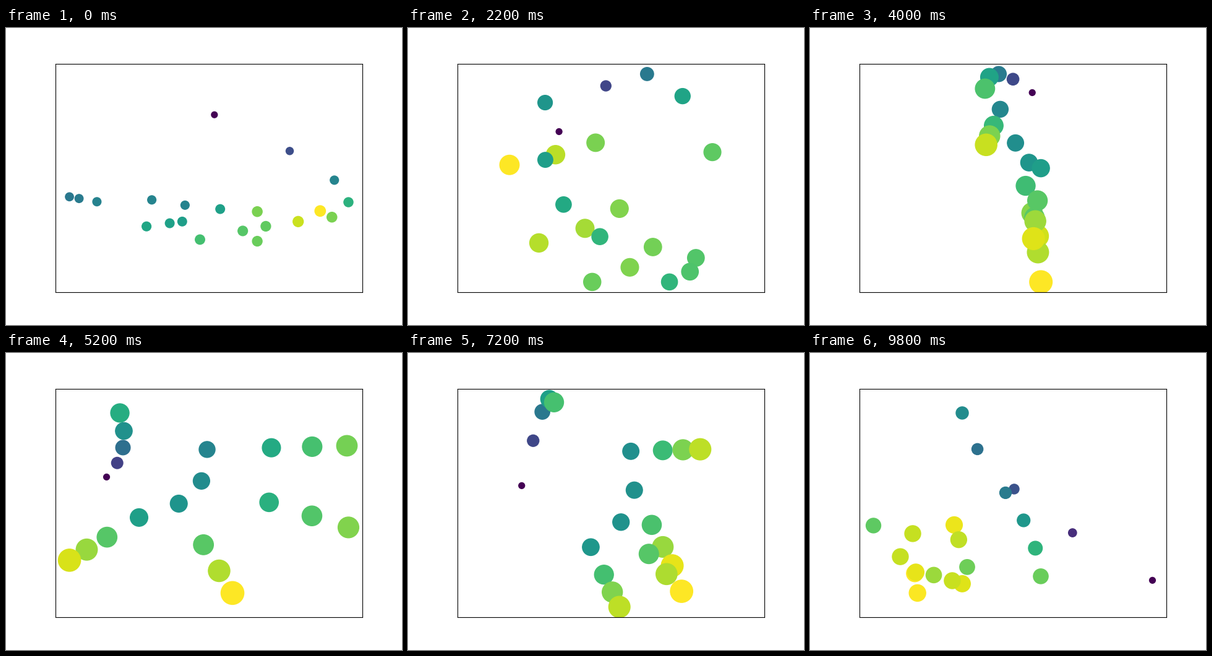
A matplotlib script for the animation above (10000 ms loop, 640 by 480 pixels).

```python
import numpy as np
import matplotlib.pyplot as plt
from matplotlib.animation import FuncAnimation

FRAMES, STEP = 50, 200
LEFT, RIGHT, TOP, BOTTOM = 80, 576, 57.6, 427.2
BASE_SIZE = 50
PIP_REACH = 0.46   # middle joint of a straight finger, as a share of its length
OPEN_DIP = 0.54    # last joint, as a share of the way from middle joint to tip
BENT_DIP = 0.35


def curve(points, count):
    """Sample the polynomial through evenly spaced key points (x, y, depth)."""
    order = len(points)
    coefs = np.polyfit(np.linspace(0, 1, order), points, order - 1)
    return np.vander(np.linspace(0, 1, count), order) @ coefs


def hand(thumb, knuckles, tips, bends=None):
    """Joints of a hand: wrist and thumb on one curve, then four fingers.

    Straight fingers run from knuckle to tip, bent ones turn at a middle joint.
    """
    base, tip = curve(knuckles, 4), curve(tips, 4)
    if bends:
        pip, share = curve(bends, 4), BENT_DIP
    else:
        pip, share = base + PIP_REACH * (tip - base), OPEN_DIP
    dip = pip + share * (tip - pip)
    fingers = np.stack([base, pip, dip, tip], axis=1).reshape(-1, 3)
    return np.vstack([curve(thumb, 5), fingers])


# step, growth of dot size with depth, joints
poses = [
    (0, 106, hand(
        thumb=[(337.5, 140, 0), (532, 246, .45), (528, 306, .8)],
        knuckles=[(407, 297, .8), (318, 290, .49), (236, 278, .45)],
        tips=[(407, 345, .77), (270, 334, .65), (147, 281, .44)],
        bends=[(509, 296, 1), (359, 321, .65), (102.5, 273, .4)])),
    (7, 305, hand(
        thumb=[(102.5, 261, 0), (387, 146, .36), (553.5, 235, .72)],
        knuckles=[(271, 127, .57), (216, 248, .66), (209, 358, .76)],
        tips=[(400, 172, 1), (324, 254, .66), (288, 343, .36)],
        bends=[(472, 172, .88), (431, 270, .88), (381, 352, .72)])),
    (15, 626, hand(
        thumb=[(505, 103.5, 0), (407, 96.5, .45), (379, 173, .78)],
        knuckles=[(307, 176, .47), (377, 227, .5), (485, 229, .55)],
        tips=[(102.5, 263, 1), (291, 398, 1), (553.5, 340, .95)])),
    (26, 668, hand(
        thumb=[(162.5, 200.5, 0), (189, 153, .36), (184, 97, .62)],
        knuckles=[(325, 156, .45), (301, 227, .5), (215, 266, .56)],
        tips=[(551, 150, .79), (553.5, 282, .81), (366, 388, 1), (102.5, 335, .94)])),
    (32, 641, hand(
        thumb=[(222, 126, 0), (279, 94, .48), (251, 143, .81)],
        knuckles=[(362, 161, .54), (305, 206, .52), (221, 212, .52)],
        tips=[(553.5, 224, 1), (466, 360, .98), (263, 391, .98), (102.5, 300, .86)])),
    (41, 626, hand(
        thumb=[(144.5, 328, 0), (116, 190, .28), (184, 98, .54)],
        knuckles=[(219, 194, .42), (296, 269, .47), (317, 360, .53)],
        tips=[(123, 101, .74), (176, 199, .91), (483, 219, 1), (553.5, 385, .93)])),
    (49, 329, hand(
        thumb=[(553.5, 367.5, 0), (330, 220, .25), (246, 97, .48)],
        knuckles=[(316, 226, .41), (356, 293, .59), (373, 361, .77)],
        tips=[(254, 346, .78), (102.5, 279, .75), (166, 292, .91), (200, 359, .85)],
        bends=[(233, 278, .97), (163, 378, 1), (246, 373, .95)])),
]


def fit(xy):
    """Scale evenly and centre inside the axes, leaving 5 % margins."""
    low, high = xy.min(axis=0), xy.max(axis=0)
    room = np.array([RIGHT - LEFT, BOTTOM - TOP]) / 1.1
    centre = np.array([LEFT + RIGHT, TOP + BOTTOM]) / 2
    return centre + (xy - (low + high) / 2) * np.min(room / (high - low))


def hand_at(frame):
    for (a, spread_a, hand_a), (b, spread_b, hand_b) in zip(poses, poses[1:]):
        if frame <= b:
            break
    t = (frame - a) / (b - a)
    t = t * t * (3 - 2 * t)
    joints = hand_a + (hand_b - hand_a) * t
    depth = joints[:, 2] / joints[:, 2].max()
    return fit(joints[:, :2]), depth, spread_a + (spread_b - spread_a) * t


fig, ax = plt.subplots(figsize=(6.4, 4.8), dpi=100)
ax.set(xlim=(LEFT, RIGHT), ylim=(BOTTOM, TOP), xticks=[], yticks=[])
dots = ax.scatter(np.zeros(21), np.zeros(21), c=np.zeros(21),
                  cmap="viridis", vmin=0, vmax=1)


def draw(frame):
    xy, depth, spread = hand_at(frame)
    dots.set_offsets(xy)
    dots.set_array(depth)
    dots.set_sizes(BASE_SIZE + spread * np.clip(depth, 0, 1))
    return dots,


anim = FuncAnimation(fig, draw, frames=FRAMES, init_func=lambda: draw(0),
                     interval=STEP, repeat=True, repeat_delay=0)
plt.show()
```
